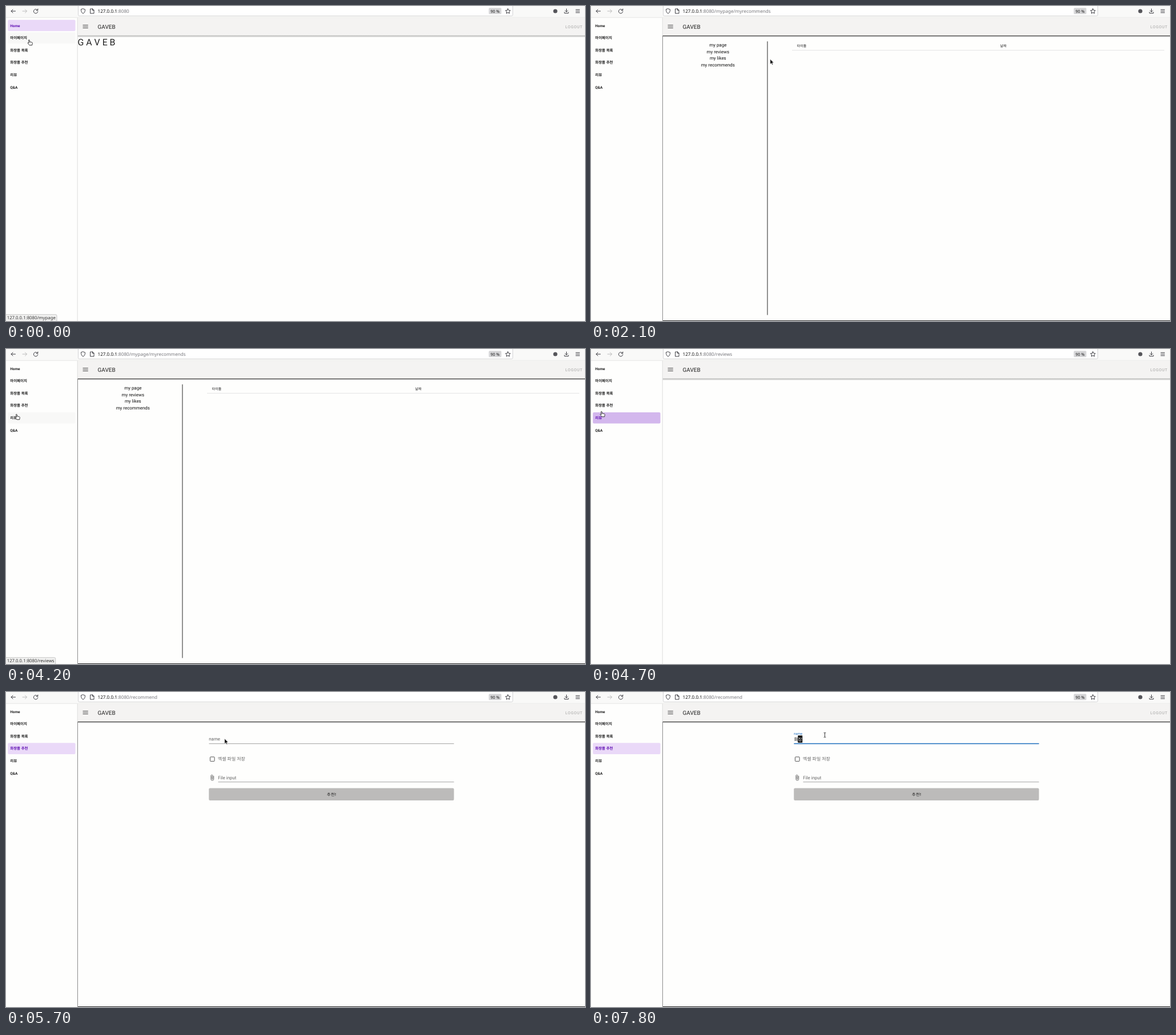
Write an HTML page that moves like this. It is 1014 px wide and 552 px high and loops after 8000 ms.

```html
<!DOCTYPE html>
<html lang="ko">
<head>
<meta charset="utf-8">
<style>
  html, body { margin: 0; width: 100%; height: 100%; overflow: hidden; background: #fefefd; }
  svg { display: block; width: 100%; height: 100%; text-rendering: geometricPrecision; }
  text { font-family: Roboto, "Noto Sans CJK KR", "Noto Sans CJK", sans-serif; font-size: 7.94px; white-space: pre; }
  .chrome { font-family: "Noto Sans", "Open Sans", sans-serif; }
  .icon { fill: none; stroke: #3c3c42; stroke-width: 1; stroke-linecap: round; stroke-linejoin: round; }
  .item { font-size: 6.47px; font-weight: 700; }
  .head { font-size: 5.96px; font-weight: 700; fill: #666; }
  .button { font-size: 6.95px; font-weight: 500; letter-spacing: .0892em; }
  .grey { fill: #666; }
</style>
</head>
<body>
<svg viewBox="0 0 1014 552">
  <defs>
    <linearGradient id="shade" x2="0" y2="1">
      <stop stop-color="#000" stop-opacity=".42"/>
      <stop offset=".4" stop-color="#000" stop-opacity=".16"/>
      <stop offset="1" stop-color="#000" stop-opacity="0"/>
    </linearGradient>
  </defs>

  <!-- browser toolbar -->
  <rect width="1014" height="20" fill="#f9f9f8"/>
  <path d="M0 20.2H1014" stroke="#dcdcdc" stroke-width=".7"/>
  <rect x="126.5" y="-3" width="761" height="20.4" rx="2" fill="#fff" stroke="#c9c9cc" stroke-width=".8"/>
  <g class="icon">
    <path d="M16.5 9H9M12 6L9 9l3 3"/>
    <path d="M29 9h7.500M33.500 6l3 3l-3 3" stroke="#bbb"/>
    <path d="M55.200 7.200A3.700 3.700 0 1 0 55.800 9.800M55.800 5v2.700h-2.700"/>
    <path d="M135 4.800l3.500 1.300c0 3.500-.8 5.700-3.500 7.100c-2.700-1.400-3.500-3.600-3.500-7.100z"/>
    <path d="M148 5h3.700l2.300 2.300v5.700h-6zM151.500 5v2.500h2.500"/>
    <path d="M879 4.800l1.300 2.700l3 .4l-2.200 2.100l.6 3l-2.700-1.500l-2.700 1.500l.6-3l-2.200-2.100l3-.4z"/>
    <path d="M981.500 5v5M979.200 8l2.300 2.300L983.800 8M978 10.800v1.800h7v-1.800"/>
    <path d="M998 6.300h6.500M998 9h6.500M998 11.700h6.500"/>
  </g>
  <circle cx="962" cy="9" r="3.600" fill="#55555a"/>
  <rect x="845.500" y="3.300" width="22" height="11" rx="1.500" fill="#d6d6d8"/>
  <text class="chrome" x="856.500" y="11.700" text-anchor="middle" style="font-size:7.200px" fill="#222">90 %</text>
  <text class="chrome" x="160.500" y="12" style="font-size:8.150px" fill="#151515">127.0.0.1<tspan id="path" fill="#77777c"></tspan></text>

  <!-- pages -->
  <g id="home"><text x="125.500" y="69.300" style="font-size:15.900px" fill="#222">G A V E B</text></g>
  <path id="frame" d="M125.500 52.200H1014M125.500 52V551.500H1014" fill="none" stroke="#222" stroke-width="1"/>
  <g id="mypage">
    <path d="M309 62V541.500" stroke="#222"/>
    <g text-anchor="middle" fill="#111">
      <text x="222.300" y="71">my page</text>
      <text x="222.300" y="82.600">my reviews</text>
      <text x="222.300" y="94.400">my likes</text>
      <text x="222.300" y="106.200">my recommends</text>
    </g>
  </g>
  <g id="table">
    <text class="head" x="360.800" y="72">타이틀</text>
    <text class="head" x="716.600" y="72">날짜</text>
    <path d="M352 77.600H1004" stroke="#dedede" stroke-width=".8"/>
  </g>
  <g id="form">
    <path d="M355.500 90.600H784.500M371.500 157.700H784.500" stroke="#8c8c8c" stroke-width=".8"/>
    <path id="focusLine" stroke="#1f6fc0" stroke-width="1.400"/>
    <text id="label" x="355.200">name</text>
    <rect x="357.500" y="113.800" width="7.600" height="7.600" rx=".7" fill="none" stroke="#555" stroke-width="1"/>
    <text class="grey" x="371" y="120.400">엑셀 파일 저장</text>
    <path class="icon" style="stroke:#666;stroke-width:.9" d="M363.800 147.500v5a2.500 2.500 0 0 1-5 0v-5.500a1.700 1.700 0 0 1 3.400 0v5a.8.8 0 0 1-1.700 0v-4.500"/>
    <text class="grey" x="371.300" y="152.800">File input</text>
    <rect x="355.300" y="168.600" width="429.200" height="21.400" rx="2" fill="#bcbbba"/>
    <text class="button" x="570.300" y="182.300" text-anchor="middle" fill="#111">추천!</text>
    <rect id="caret" x="355.500" y="78" width="1" height="10" fill="#111"/>
    <rect id="composeBox" y="76.300" width="7.800" height="12.400" fill="#000"/>
    <text id="typed" x="355.500" y="85.700" fill="#111"></text>
    <text id="composing" y="85.700" fill="#fff"></text>
  </g>

  <!-- app bar -->
  <rect x="125.500" y="51.500" width="889" height="4" fill="url(#shade)"/>
  <rect x="125.500" y="20.500" width="889" height="31" fill="#f4f3f2"/>
  <path class="icon" style="stroke:#555;stroke-linecap:butt" d="M134.500 33.400h9.300M134.500 36h9.300M134.500 38.600h9.300"/>
  <text x="160.600" y="39.600" style="font-size:9.950px" fill="#222">GAVEB</text>
  <text class="button" x="979.600" y="38.500" fill="#b5b5b4">LOGOUT</text>

  <!-- side menu -->
  <path d="M125.200 20.500V552" stroke="#dadada" stroke-width=".9"/>
  <g id="menu"></g>

  <g id="status">
    <rect id="statusBox" x="-3" y="540.700" height="15" rx="2" fill="#f1f1f0" stroke="#b9b9b9" stroke-width=".8"/>
    <text id="statusText" class="chrome" x="1.700" y="549.400" style="font-size:7.780px" fill="#333"></text>
  </g>

  <path id="hand" d="M-2.500-4c.2-.9 1.500-.9 1.700 0l.5 3l3 .4c1.300.2 1.700.9 1.500 2l-.5 3.300h-4.700l-2.700-3.400c-.5-.9.3-1.600 1.100-1l.9.700z" fill="#fff" stroke="#222" stroke-width=".9" stroke-linejoin="round"/>
  <path id="arrow" d="M.5.500v8.800l2-1.900l1.400 3l1.400-.6l-1.300-2.900h2.700z" fill="#111" stroke="#fff" stroke-width=".5"/>
  <path id="beam" d="M-1.800-4h1.300l.5.400l.5-.4h1.300M0-3.600v7.200M-1.800 4h1.300l.5-.4l.5.400h1.300" fill="none" stroke="#222" stroke-width=".9"/>
</svg>
<script>
const LOOP = 8000, STEP = 100;
const $ = id => document.getElementById(id);
const set = (el, attrs) => { for (const k in attrs) el.setAttribute(k, attrs[k]); };
const show = (id, on) => $(id).style.display = on ? '' : 'none';
const clamp = x => Math.max(0, Math.min(1, x));
const lerp = (a, b, p) => a + (b - a) * p;
const latest = (list, t) => list.filter(entry => entry[0] <= t).pop();

// time, path, visible groups, active menu row
const pages = [
  [0, '', ['home'], 0],
  [600, '/mypage', ['frame', 'mypage'], 1],
  [1700, '/mypage/myrecommends', ['frame', 'mypage', 'table'], -1],
  [4500, '/reviews', [], 4],
  [5000, '/recommend', ['frame', 'form'], 3],
];
// start, end, link, hovered menu row
const hovers = [
  [0, 600, '/mypage', 1],
  [3300, 3400, '/mypage', 1],
  [3400, 3600, '/coslist', 2],
  [3600, 3800, '/recommend', 3],
  [3800, 4500, '/reviews', 4],
  [4800, 5000, '/recommend', 3],
];
// time, x, y, shape
const pointer = [
  [0, 42, 64, 'hand'], [900, 42, 64, 'arrow'], [1400, 224, 109, 'hand'],
  [2000, 224, 109, 'arrow'], [2300, 492, 60, 'arrow'], [2700, 492, 60, 'arrow'],
  [2900, 388, 94, 'arrow'], [3000, 388, 94, 'arrow'], [3300, 64, 65, 'hand'],
  [3400, 52, 71, 'hand'], [3900, 20, 119, 'hand'], [4600, 20, 119, 'hand'],
  [4700, 20, 114, 'hand'], [4900, 46, 97, 'hand'], [5100, 47, 96, 'arrow'],
  [5400, 331, 88, 'arrow'], [5500, 331, 88, 'arrow'], [5800, 408, 78, 'beam'],
  [6000, 409.5, 75.300, 'beam'], [LOOP, 409.500, 75.300, 'beam'],
];
const typing = [
  [0, ''], [6400, 'ㅇ'], [6800, ''], [7300, 'ㅎ'], [7400, '호'],
  [7500, '화'], [7600, '화자'], [7800, '화장'],
];

const rows = ['Home', '마이페이지', '화장품 목록', '화장품 추천', '리뷰', 'Q&A'].map((name, i) => {
  const add = (tag, attrs) => {
    const el = document.createElementNS('http://www.w3.org/2000/svg', tag);
    set(el, attrs);
    return $('menu').appendChild(el);
  };
  const y = 24.300 + i * 21.650;
  const box = { x: 3.300, y, width: 118.200, height: 19.700, rx: 2 };
  const row = {
    back: add('rect', box),
    ripple: add('rect', { ...box, fill: '#5e0fb5' }),
    text: add('text', { class: 'item', x: 7.200, y: y + 12.200 }),
  };
  row.text.textContent = name;
  return row;
});

function drawMenu(t, page) {
  const before = pages[pages.indexOf(page) - 1];
  const since = t - page[0];
  rows.forEach((row, i) => {
    const active = i === page[3];
    const leaving = before && before[3] === i ? clamp(1 - since / 140) : 0;
    const hovered = hovers.some(h => h[3] === i && t >= h[0] && t <= h[1] + (h[0] >= 3300 && h[1] < 4000 ? 0 : -1));
    set(row.back, {
      fill: active || leaving ? '#ead9f8' : '#f8f8f7',
      opacity: active || hovered ? 1 : leaving,
    });
    set(row.ripple, { opacity: active && page[0] ? .3 * clamp(1 - since / 450) : 0 });
    set(row.text, { fill: active ? '#6212b4' : '#222' });
  });
}

function drawStatus(t) {
  const hover = latest(hovers, t);
  const opacity = [1, .6, .3][Math.max(0, Math.ceil((t - hover[1] + 1) / STEP))] || 0;
  $('statusText').textContent = '127.0.0.1:8080' + hover[2];
  set($('status'), { opacity });
  set($('statusBox'), { width: $('statusText').getComputedTextLength() + 6.800 });
}

function drawPointer(t) {
  const from = latest(pointer, t);
  const to = pointer[pointer.indexOf(from) + 1];
  const p = (t - from[0]) / (to[0] - from[0]);
  for (const shape of ['hand', 'arrow', 'beam']) show(shape, shape === from[3]);
  set($(from[3]), { transform: `translate(${lerp(from[1], to[1], p)} ${lerp(from[2], to[2], p)})` });
}

function drawField(t) {
  const focus = clamp((t - 5900) / 300);
  const half = 214.500 * focus;
  set($('focusLine'), { d: `M${570 - half} 90.500H${570 + half}` });
  set($('label'), { y: lerp(85.400, 75, focus), fill: focus ? '#1f6fc0' : '#666' });
  $('label').style.fontSize = lerp(7.940, 5.950, focus) + 'px';

  const value = latest(typing, t)[1];
  const done = value.slice(0, -1);
  const x = 355.300 + done.length * 7.100;
  $('typed').textContent = done;
  $('composing').textContent = value.slice(-1);
  set($('composeBox'), { x });
  set($('composing'), { x: x + .2 });
  show('composeBox', value);
  show('caret', t >= 7000 && !value);
}

function draw(now) {
  const t = Math.floor(now % LOOP / STEP) * STEP;
  const page = latest(pages, t);
  $('path').textContent = ':8080' + page[1];
  for (const id of ['home', 'frame', 'mypage', 'table', 'form']) show(id, page[2].includes(id));
  drawMenu(t, page);
  drawStatus(t);
  drawPointer(t);
  drawField(t);
}

const start = performance.now();
function tick() {
  draw(performance.now() - start);
  requestAnimationFrame(tick);
}
tick();
</script>
</body>
</html>
```
